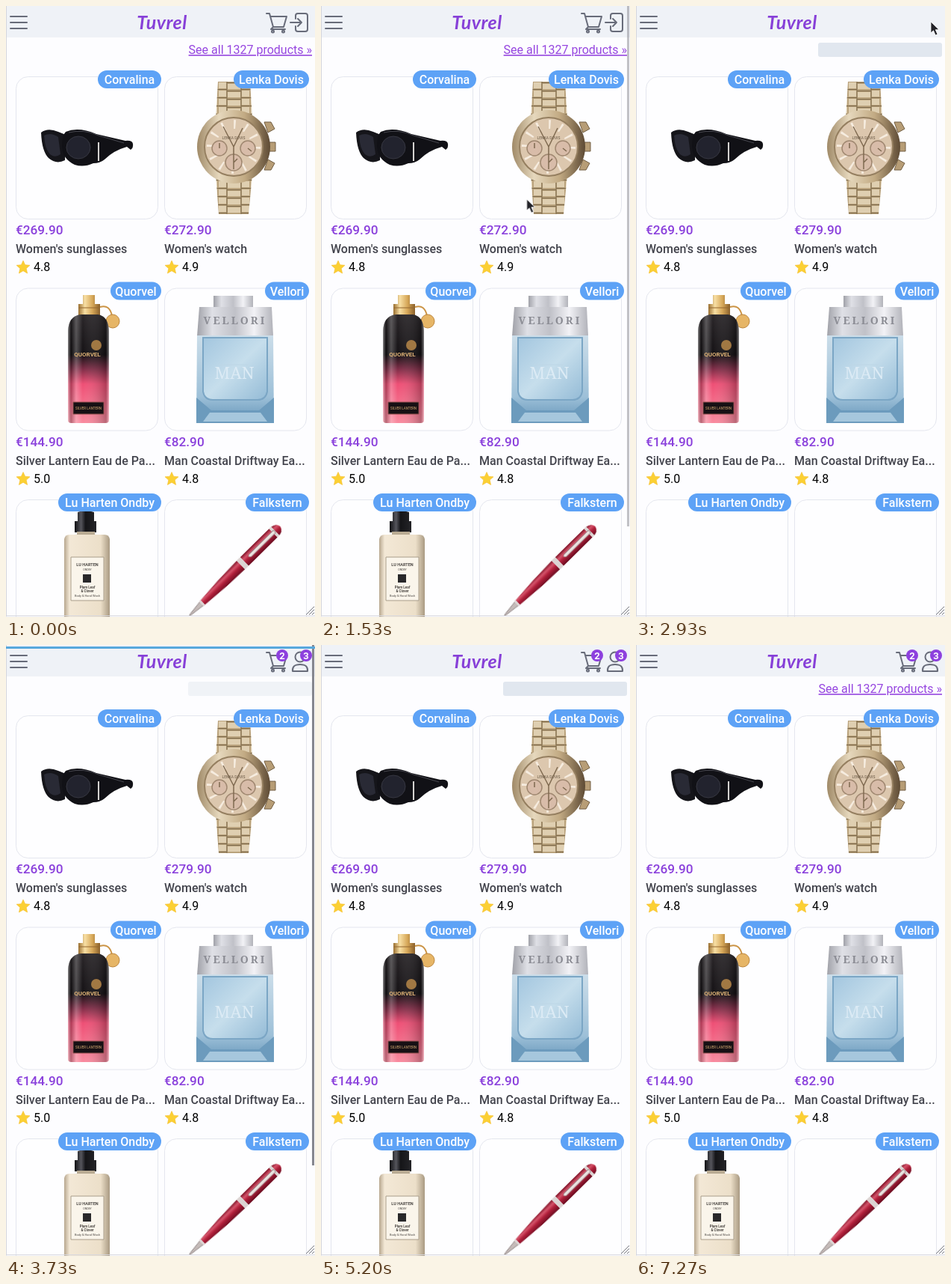
An HTML page that plays this animation: 414x816 px, repeating every 7340 ms.

```html
<!DOCTYPE html>
<html lang="en">
<head>
<meta charset="utf-8">
<title>Shop</title>
<style>
html, body { margin: 0; width: 100%; height: 100%; overflow: hidden; background: #fdfdff; }
svg { display: block; width: 100vw; height: 100vh; }
text { font: 16px Roboto, sans-serif; }
.brand { font: italic 700 25px Lato, cursive; fill: #8740d8; letter-spacing: .5px; }
.link { fill: #9646e0; text-decoration: underline; }
.pill { font-weight: 500; fill: #fff; text-anchor: middle; }
.price { font-weight: 500; font-size: 17.2px; fill: #8a40dc; }
.name { font-weight: 500; fill: #42434c; }
.badge { font-weight: 700; font-size: 13px; fill: #fff; text-anchor: middle; }
.mid { text-anchor: middle; }
.icon { fill: none; stroke: #686c7a; stroke-width: 2; stroke-linejoin: round; stroke-linecap: round; }

/* All parts share one 7.34 s clock; percentages are moments of it. */
.t { animation: 7.34s linear infinite; }
.hard { animation-timing-function: step-end; }
.before { animation-name: before; }
.after { animation-name: after; }
.user { animation-name: user; }
.cart { animation-name: cart; }
.late { animation-name: late; }
.linkShow { animation-name: linkShow; }
.skeleton { animation-name: pulse; animation-timing-function: ease-in-out; }
.scroll { animation-name: scroll; }
.progress { animation-name: progress; }
.cursor { animation-name: cursor; }
@keyframes before { 0% { opacity: 1 } 35.4%, 100% { opacity: 0 } }
@keyframes after { 0% { opacity: 0 } 35.4%, 100% { opacity: 1 } }
@keyframes user { 0% { opacity: 0 } 45%, 100% { opacity: 1 } }
@keyframes cart { 0% { opacity: 1 } 35.4% { opacity: 0 } 45%, 100% { opacity: 1 } }
@keyframes late { 0% { opacity: 1 } 35.4% { opacity: 0 } 43%, 100% { opacity: 1 } }
@keyframes linkShow { 0% { opacity: 1 } 35.4% { opacity: 0 } 83.1%, 100% { opacity: 1 } }
@keyframes pulse {
  0%, 35.4% { opacity: 0 }
  35.41% { opacity: .9 }
  38.83% { opacity: 1 }
  53.81% { opacity: .4 }
  68.8% { opacity: 1 }
  83.09% { opacity: .4 }
  83.1%, 100% { opacity: 0 }
}
@keyframes scroll {
  0%, 18.3% { opacity: 0 }
  18.8%, 31% { opacity: .5 }
  33%, 44.9% { opacity: 0 }
  45.5%, 57% { opacity: 1 }
  59%, 100% { opacity: 0 }
}
@keyframes progress {
  0%, 45% { transform: scaleX(0); opacity: 1 }
  49.7%, 53% { transform: scaleX(1); opacity: 1 }
  55.9%, 100% { transform: scaleX(1); opacity: 0 }
}
@keyframes cursor {
  0%, 17.7% { transform: translate(205px, 410px); opacity: 0 }
  17.71% { transform: translate(205px, 410px); opacity: 1 }
  20.8% { transform: translate(275px, 260px); opacity: 1 }
  25.9% { transform: translate(330px, 90px) }
  28.6% { transform: translate(352px, -25px) }
  38.1% { transform: translate(382px, -25px) }
  39.8%, 40.4% { transform: translate(395px, 21px) }
  42%, 100% { transform: translate(416px, 34px); opacity: 1 }
}
</style>
</head>
<body>
<svg viewBox="0 0 414 816" preserveAspectRatio="none">
  <defs>
    <linearGradient id="gold">
      <stop stop-color="#9a6f30"/><stop offset=".3" stop-color="#f8dfa4"/>
      <stop offset=".65" stop-color="#d6a758"/><stop offset="1" stop-color="#8a602b"/>
    </linearGradient>
    <linearGradient id="bezel">
      <stop stop-color="#a08a68"/><stop offset=".3" stop-color="#e6d8bd"/>
      <stop offset=".65" stop-color="#c2aa83"/><stop offset="1" stop-color="#5e4b35"/>
    </linearGradient>
    <linearGradient id="silver">
      <stop stop-color="#a0a1a8"/><stop offset=".2" stop-color="#dfe0e6"/>
      <stop offset=".5" stop-color="#c0c1c8"/><stop offset=".75" stop-color="#f2f2f6"/>
      <stop offset="1" stop-color="#b2b3ba"/>
    </linearGradient>
    <linearGradient id="rose" x2="0" y2="1">
      <stop stop-color="#2a2629"/><stop offset=".37" stop-color="#141114"/>
      <stop offset=".5" stop-color="#7d2c46"/><stop offset=".64" stop-color="#ee4f75"/>
      <stop offset="1" stop-color="#f98a9e"/>
    </linearGradient>
    <linearGradient id="sheen">
      <stop stop-color="#fff" stop-opacity=".5"/><stop offset=".08" stop-color="#000" stop-opacity=".25"/>
      <stop offset=".2" stop-color="#fff" stop-opacity=".25"/><stop offset=".36" stop-color="#fff" stop-opacity="0"/>
      <stop offset=".92" stop-color="#000" stop-opacity=".25"/><stop offset="1" stop-color="#fff" stop-opacity=".45"/>
    </linearGradient>
    <linearGradient id="glass" x2="0" y2="1">
      <stop stop-color="#cbdde9"/><stop offset=".7" stop-color="#9dc0d8"/><stop offset="1" stop-color="#6394b8"/>
    </linearGradient>
    <linearGradient id="liquid" x2="1" y2="1">
      <stop stop-color="#a3c6df"/><stop offset=".5" stop-color="#c6deec"/><stop offset="1" stop-color="#94bbd6"/>
    </linearGradient>
    <linearGradient id="cream">
      <stop stop-color="#b7a78f"/><stop offset=".12" stop-color="#f3e8d6"/>
      <stop offset=".8" stop-color="#ecdfc9"/><stop offset="1" stop-color="#a99a82"/>
    </linearGradient>
    <linearGradient id="black">
      <stop stop-color="#111114"/><stop offset=".3" stop-color="#55555c"/><stop offset=".5" stop-color="#151518"/>
      <stop offset="1" stop-color="#242428"/>
    </linearGradient>
    <linearGradient id="red" x2="0" y2="1">
      <stop stop-color="#7f1428"/><stop offset=".3" stop-color="#d5536a"/>
      <stop offset=".55" stop-color="#b01f3a"/><stop offset="1" stop-color="#6a0c20"/>
    </linearGradient>
    <pattern id="links" x="284" y="101" width="43" height="11" patternUnits="userSpaceOnUse">
      <path d="M0 0H43V11H0Z" fill="#b9a27c"/>
      <path d="M1 1H11V9H1ZM32 1H42V9H32ZM13 3H30V10H13Z" fill="#dfcfb1"/>
      <path d="M0 10.5H12M31 10.5H43M12 0V11M31 0V11M12 1.5H31" stroke="#7d6a4c"/>
    </pattern>
    <path id="star" d="M0-9 2.6-3.3 9-2.7 4.2 1.6 5.6 8 0 4.700-5.600 8-4.200 1.600-9-2.700-2.600-3.300Z" fill="#fbd034" stroke="#f6bd2a" stroke-width=".6"/>
    <path id="flask" d="M83 434Q84 414 100 412H123Q137 414 138 434V553Q138 557 133 557H88Q83 557 83 553Z"/>
  </defs>

  <rect width="414" height="816" fill="#fdfdff"/>
  <g id="cards"></g>

  <g id="sunglasses">
    <path d="M47 169Q56 162 70 168L80 172L79 206Q67 212 57 203Q48 194 47 169Z" fill="#15151a"/>
    <path d="M51 173Q60 168 70 175L73 198Q65 204 58 197Q52 190 51 173Z" fill="#292a35"/>
    <path d="M80 168Q97 161 121 171L160 180Q169 179 170 184Q171 189 167 192L162 188Q144 193 132 205Q126 210 117 210Q104 216 92 212Q75 204 75 186Q75 173 80 168Z" fill="#111116"/>
    <ellipse cx="97" cy="189" rx="16" ry="15" fill="#22232e" stroke="#373842"/>
    <path d="M124 182V207" stroke="#d4d2d0" stroke-width="2"/>
    <path d="M84 169Q104 164 124 173L158 183" fill="none" stroke="#45454d"/>
  </g>

  <g id="watch">
    <path d="M284 101H327L330 150H281ZM281 225H330L325 278H285Z" fill="url(#links)"/>
    <path d="M350 182H361V194H350ZM346 155 355 155 360 164 351 169ZM351 205 360 210 355 219 346 219Z" fill="#b79d76" stroke="#715d42"/>
    <circle cx="305" cy="188" r="49" fill="url(#bezel)"/>
    <circle cx="305" cy="188" r="39" fill="#dcc7ae" stroke="#957f60" stroke-width="2"/>
    <circle cx="305" cy="188" r="30" fill="none" stroke="#f6ecdf" stroke-width="12" stroke-dasharray="2.500 13.200"/>
    <g fill="#d8bca9" stroke="#a08871" stroke-width="1.500">
      <circle cx="286" cy="190" r="10"/><circle cx="324" cy="190" r="10"/><circle cx="305" cy="209" r="11"/>
    </g>
    <path d="M305 188 291 161M305 188 317 163M305 188V218M286 190V183M324 190 329 194M305 209 310 204" stroke="#7f6a50" stroke-width="1.500"/>
    <text class="mid" x="305" y="178" style="font-size:5px" fill="#675744">LENKA DOVIS</text>
  </g>

  <g id="roseBottle">
    <path d="M126 402Q139 398 142 414" fill="none" stroke="#cb9446" stroke-width="2"/>
    <circle cx="143" cy="421" r="9" fill="#e6b566" stroke="#bd863c"/>
    <path d="M103 386H119V398H126V414H97V398H103Z" fill="url(#gold)"/>
    <path d="M97 403H126" stroke="#94672f"/>
    <use href="#flask" fill="url(#rose)"/>
    <use href="#flask" fill="url(#sheen)"/>
    <circle cx="121" cy="453" r="7" fill="#a17843"/>
    <text class="mid" x="109" y="468" style="font-size:8px;font-weight:700" fill="#dcb075">QUORVEL</text>
    <path d="M90 529H131V545H90Z" fill="#171014" stroke="#8f4f4c"/>
    <text class="mid" x="110.5" y="539" style="font-size:4.5px" fill="#dcb075">SILVER LANTERN</text>
  </g>

  <g id="glassBottle">
    <path d="M278 387H331V404H278Z" fill="url(#silver)"/>
    <path d="M259 402H356L358 441H256Z" fill="url(#silver)"/>
    <text class="mid" x="307" y="425" style="font:700 14px 'Noto Serif',serif;letter-spacing:3px" fill="#8b8c94">VELLORI</text>
    <path d="M256 440H358L359 557H255Z" fill="url(#glass)"/>
    <path d="M255 523 275 540H339L359 523V557H255Z" fill="#6c9bbd"/>
    <path d="M273 543H341L350 555H264Z" fill="#a6c7dd"/>
    <path d="M264 443H350V515Q348 526 337 526H277Q266 526 264 515Z" fill="url(#liquid)" stroke="#7ba6c5" stroke-width="2"/>
    <text class="mid" x="306" y="498" style="font:22px 'Noto Serif',serif" fill="#dcebf5">MAN</text>
    <path d="M286 479H325" stroke="#bdd6e6"/>
  </g>

  <g class="t hard late">
    <g id="creamBottle">
      <path d="M96 676Q106 672 118 676V688H121V703H92V688H96Z" fill="url(#black)"/>
      <path d="M95 702H119V707H95Z" fill="#b9ab93"/>
      <path d="M78 712Q79 706 85 706H132Q138 706 139 712V816H78Z" fill="url(#cream)"/>
      <path d="M87 736H131V794H87Z" fill="#faf5eb" stroke="#a99d8a"/>
      <path d="M103 759H114V770H103Z" fill="#29282a"/>
      <g class="mid" fill="#4b4743">
        <text x="109" y="748" style="font-size:5.5px;font-weight:700">LU HARTEN</text>
        <text x="109" y="754" style="font-size:3.5px">ONDBY</text>
        <text x="109" y="778" style="font-size:4.5px;font-weight:700">Plum Leaf</text>
        <text x="109" y="783" style="font-size:4.5px;font-weight:700">&amp; Clover</text>
        <text x="109" y="789" style="font-size:4px">Body &amp; Hand Wash</text>
      </g>
    </g>
    <g id="pen" transform="translate(246 814) rotate(-44.5)">
      <path d="M0-.6 24-3.600V3.600L0 .6Z" fill="#c5bbb9" stroke="#7d7070" stroke-width=".7"/>
      <path d="M22-4Q60-7.500 98-8H160Q169-7 170 0Q169 7 160 8H98Q60 7.500 22 4Z" fill="url(#red)"/>
      <path d="M96-8.300H103V8.300H96ZM157-8.300H161V8.300H157ZM22-4.200H25V4.200H22Z" fill="#dcd4d3"/>
      <path d="M160-2.500H114Q109-1 114 2H160Z" fill="#ebe3e0" stroke="#8d7377" stroke-width=".8"/>
    </g>
  </g>

  <g id="pills"></g>

  <rect width="414" height="42" fill="#eff2f7"/>
  <path class="icon" d="M6 14H28M6 22H28M6 30H28"/>
  <text class="brand mid" x="209" y="31">Tuvrel</text>
  <g class="t hard cart">
    <path class="icon" d="M349 10H353L358 28H372L376 14H354.500M358 28 355 31H374"/>
    <circle class="icon" cx="357.500" cy="34" r="1.500"/><circle class="icon" cx="371.500" cy="34" r="1.500"/>
  </g>
  <path class="icon t hard before" d="M388 17V13Q388 10 391 10H401Q404 10 404 13V31Q404 34 401 34H391Q388 34 388 31V27M381 22H396M391 17 396 22 391 27"/>
  <g class="t hard user">
    <circle class="icon" cx="394" cy="16" r="6.500"/>
    <path class="icon" d="M384 35Q383 26 394 26T404 35Z"/>
    <circle cx="370" cy="14" r="8" fill="#8d40de"/><text class="badge" x="370" y="18.500">2</text>
    <circle cx="402" cy="14" r="8" fill="#8d40de"/><text class="badge" x="402" y="18.500">3</text>
  </g>

  <text class="link t hard linkShow" x="410" y="64" text-anchor="end">See all 1327 products »</text>
  <rect class="t skeleton" x="244" y="49" width="166" height="19" rx="3" fill="#e1e7ef"/>
  <path d="M.5 0V815.500M0 814.500H414" stroke="#d5d6de"/>
  <path d="M402 813 413 802M406 813 413 806M410 813 413 810" stroke="#75767e"/>
  <rect class="t scroll" x="410" width="3" height="695" fill="#85868e"/>
  <rect class="t progress" y="2" width="414" height="3" fill="#58a8dc"/>
  <path class="t cursor" d="M0 0V15L3.500 11.800 6.200 18 9 16.800 6.300 10.700H11Z" fill="#222227" stroke="#fff" stroke-width=".8"/>
</svg>
<script>
const products = [
  { brand: "Corvalina", pill: 85, price: "€269.90", name: "Women's sunglasses", rating: "4.8" },
  { brand: "Lenka Dovis", pill: 101, price: "€272.90", newPrice: "€279.90", name: "Women's watch", rating: "4.9" },
  { brand: "Quorvel", pill: 68, price: "€144.90", name: "Silver Lantern Eau de Pa...", rating: "5.0" },
  { brand: "Vellori", pill: 59, price: "€82.90", name: "Man Coastal Driftway Ea...", rating: "4.8" },
  { brand: "Lu Harten Ondby", pill: 138 },
  { brand: "Falkstern", pill: 85 }
];
const place = i => ({ x: i % 2 ? 212 : 13, y: 94 + Math.floor(i / 2) * 282.5 });
const text = (x, y, cls, value) => `<text x="${x}" y="${y}" class="${cls}">${value}</text>`;

function card(p, i) {
  const { x, y } = place(i);
  const frame = `<rect x="${x + .5}" y="${y + .5}" width="190" height="190" rx="16" fill="#fefeff" stroke="#e4e6ee"/>`;
  if (!p.price) return frame;
  const price = p.newPrice
    ? text(x, y + 211, "price t hard before", p.price) + text(x, y + 211, "price t hard after", p.newPrice)
    : text(x, y + 211, "price", p.price);
  return frame + price + text(x, y + 236, "name", p.name) +
    `<use href="#star" x="${x + 10}" y="${y + 255}"/>` + text(x + 24, y + 260, "", p.rating);
}

function pill(p, i) {
  const { y } = place(i), right = i % 2 ? 406 : 208;
  return `<rect x="${right - p.pill}" y="${y - 8}" width="${p.pill}" height="24" rx="12" fill="#5da2f6"/>` +
    text(right - p.pill / 2, y + 10, "pill", p.brand);
}

document.getElementById("cards").innerHTML = products.map(card).join("");
document.getElementById("pills").innerHTML = products.map(pill).join("");
</script>
</body>
</html>
```
